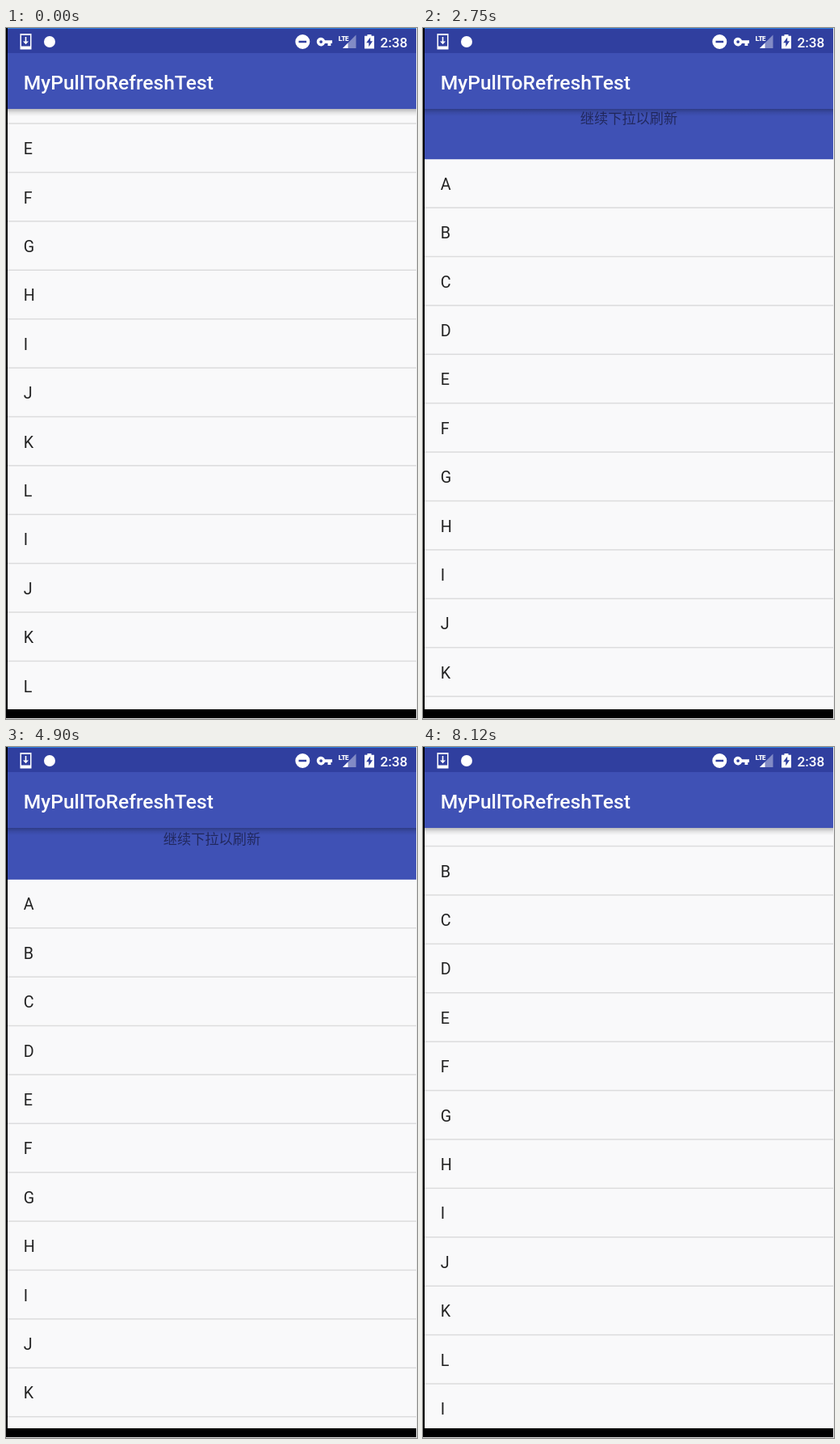
Recreate the animation shown at these times as an HTML page. Size 509 by 854 pixels, loop 8.62 s.

```html
<!DOCTYPE html>
<html lang="zh">
<head>
<meta charset="utf-8">
<title>Pull to refresh</title>
<style>
html, body { margin: 0; width: 100%; height: 100%; overflow: hidden; background: #000; }
svg { display: block; width: 509px; height: 854px; font-family: Roboto, sans-serif; }
.row { font-size: 19.7px; fill: #212121; }
.bar { font-weight: 500; fill: #fff; }
#hint { font: 17.2px "Noto Sans CJK SC", "Noto Sans CJK", sans-serif; fill: #22295f; text-anchor: middle; }
</style>
</head>
<body>
<svg viewBox="0 0 509 854">
  <defs>
    <linearGradient id="shade" x2="0" y2="1">
      <stop offset="0" stop-opacity=".26"/>
      <stop offset=".5" stop-opacity=".09"/>
      <stop offset="1" stop-opacity="0"/>
    </linearGradient>
    <clipPath id="view"><rect x="2" y="100" width="506" height="742"/></clipPath>
  </defs>
  <rect width="509" height="854" fill="#000"/>
  <rect x="2" y="100" width="506" height="742" fill="#f9f9fa"/>

  <g clip-path="url(#view)">
    <g id="list">
      <g id="header">
        <rect x="2" y="-101" width="506" height="101" fill="#3f51b5"/>
        <text id="hint" x="255" y="-44.2"></text>
      </g>
    </g>
    <rect x="2" y="100" width="506" height="9" fill="url(#shade)"/>
    <rect id="strip" x="2" width="506" height="4.6" fill="#cbcbcb"/>
    <path id="glow" d="M2 0H508V40A1200 1200 0 0 1 2 40Z" fill="#3f51b5"/>
    <rect id="thumb" x="503" width="5" height="567" fill="#000" fill-opacity=".3"/>
  </g>

  <rect x="2" width="506" height="31" fill="#303f9f"/>
  <rect x="2" width="506" height="1" fill="#2f7fdc"/>
  <rect x="2" y="31" width="506" height="69" fill="#3f51b5"/>
  <text class="bar" x="21.7" y="75.5" font-size="24.6">MyPullToRefreshTest</text>
  <rect x="508" width="1" height="854" fill="#eee"/>
  <rect y="853" width="509" height="1" fill="#ddd"/>

  <g fill="#fff">
    <path fill-rule="evenodd" d="M17.5 7H31.5V26.500H17.500ZM19 9V22.500H30V9Z"/>
    <path d="M23.700 11H25.300V16.500H28L24.500 20.300L21 16.500H23.700Z"/>
    <circle cx="54" cy="17" r="7"/>
    <path fill-rule="evenodd" d="M358.300 17a9 9 0 1 0 18 0a9 9 0 1 0-18 0ZM362.500 15.800H372.100V18.200H362.500Z"/>
    <path fill-rule="evenodd" d="M395 15.200H404V19H402.300V22H398.500V19H395A5.300 5.300 0 1 1 395 15.200ZM388.200 17.100a1.900 1.900 0 1 0 3.800 0a1.900 1.900 0 1 0-3.800 0Z"/>
    <path d="M417 25H433.500V8.500L425 17Z" opacity=".4"/>
    <path d="M417 25H423.500V18.500Z"/>
    <path fill-rule="evenodd" d="M444 9.700H447.500V8H452.500V9.700H456V25.500H444ZM451.200 11.500L446.200 18.200H449.300V23.300L454 16.300H451.200Z"/>
  </g>
  <text class="bar" x="411.300" y="15.800" font-size="9.500" style="font-family:'Open Sans',sans-serif;font-weight:700" letter-spacing="-1.2">LTE</text>
  <text class="bar" x="463.500" y="23.600" font-size="17.200">2:38</text>
</svg>
<script>
const LOOP = 8620, ROW = 60.4, REST = 104.6, SVG = 'http://www.w3.org/2000/svg';
const [list, header, hint, strip, glow, thumb] =
  ['list', 'header', 'hint', 'strip', 'glow', 'thumb'].map(id => document.getElementById(id));

function add(tag, attrs, text = '') {
  const el = document.createElementNS(SVG, tag);
  for (const key in attrs) el.setAttribute(key, attrs[key]);
  el.textContent = text;
  list.append(el);
}

[...'ABCDEFGHIJKLIJKL'].forEach((letter, i) => {
  add('text', { class: 'row', x: 21.7, y: i * ROW + 37.5 }, letter);
  add('rect', { x: 2, y: (i + 1) * ROW - 1.3, width: 506, height: 1.5, fill: '#dcdcdd' });
});

const smooth = p => p * p * (3 - 2 * p);
const easeOut = p => 1 - (1 - p) ** 2;
const linear = p => p;

// Each step: time, value, easing on the way there
const scroll = [
  [0, -123], [1030, -123], [1660, REST, smooth], [2300, REST],
  [3160, 212, smooth], [3290, 205.6], [3500, REST, smooth], [3860, REST],
  [4370, 199.8, smooth], [4440, 199.8], [5290, 136, smooth], [5410, 136],
  [5530, REST, smooth], [5610, REST], [5950, -30, smooth],
  [6120, 0.8, smooth], [6470, 62.7, easeOut], [LOOP, 62.7]
];
const glowSize = [[0, 0], [1640, 0], [1810, 1, easeOut], [1850, 1], [2120, 0, smooth], [LOOP, 0]];
const thumbFade = [
  [0, 0], [1030, 0], [1060, 1], [1900, 1], [2120, 0], [5610, 0],
  [5640, 1], [6710, 1], [7160, 0], [LOOP, 0]
];

function valueAt(steps, t) {
  const i = steps.findIndex(step => step[0] > t);
  const [t0, from] = steps[i - 1], [t1, to, ease = linear] = steps[i];
  return from + (to - from) * ease((t - t0) / (t1 - t0));
}

function draw() {
  const t = performance.now() % LOOP;
  const top = valueAt(scroll, t), glowing = valueAt(glowSize, t);
  const pulled = top > REST + 0.5, full = top > 202;

  list.setAttribute('transform', `translate(0 ${top})`);
  header.setAttribute('visibility', pulled ? 'visible' : 'hidden');
  hint.textContent = full ? '释放即可刷新' : '继续下拉以刷新';

  strip.setAttribute('y', full ? 100 : top - 4.6);
  strip.setAttribute('height', full ? top - 201 : 4.6);
  strip.setAttribute('visibility', pulled && !full ? 'hidden' : 'visible');

  glow.setAttribute('transform', `translate(0 100) scale(1 ${glowing})`);
  glow.setAttribute('opacity', 0.27 * glowing);

  thumb.setAttribute('y', 100 + (REST - top) * 0.75);
  thumb.setAttribute('opacity', valueAt(thumbFade, t));
  requestAnimationFrame(draw);
}
draw();
</script>
</body>
</html>
```
